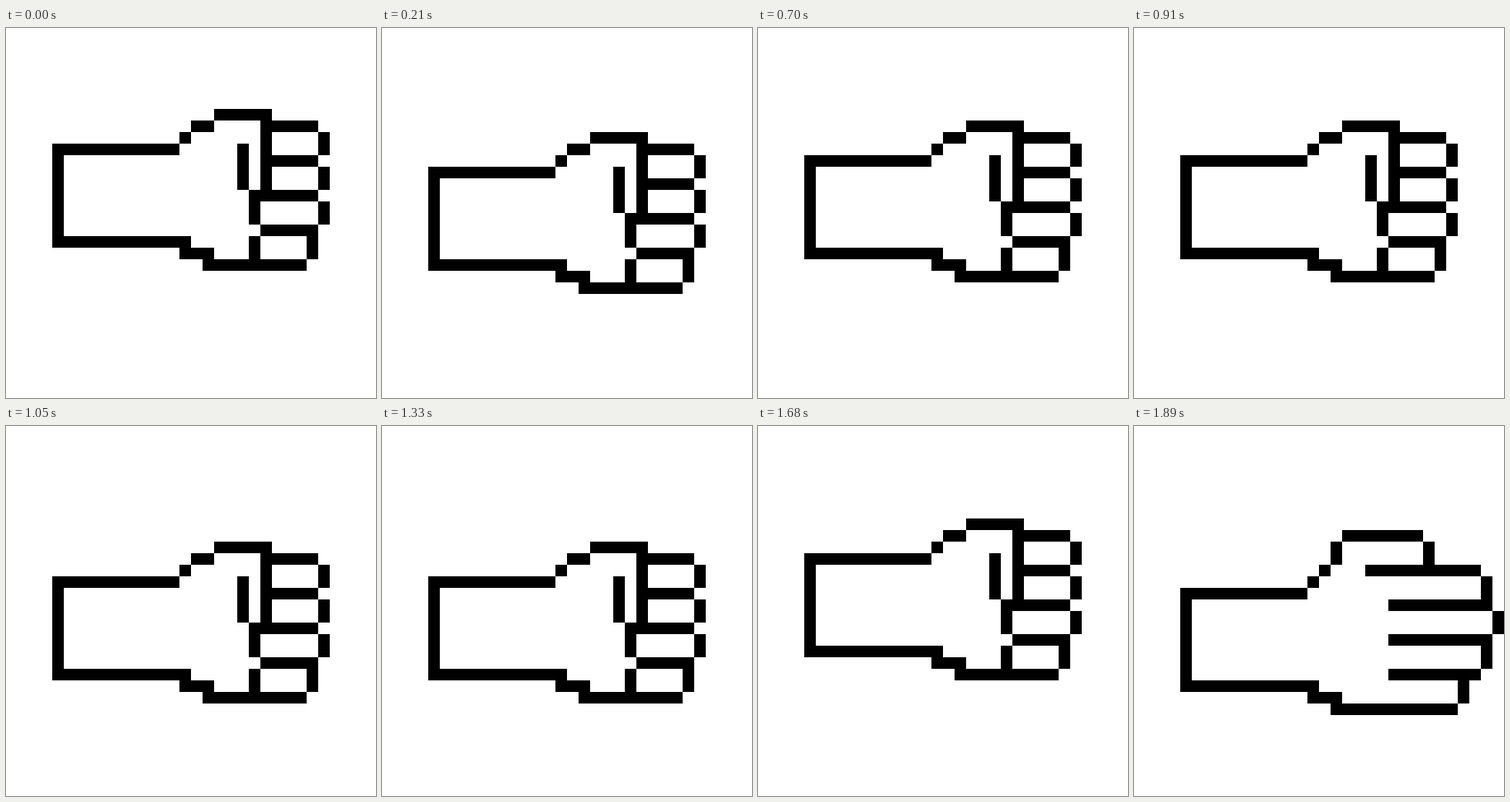
An HTML page for the animation above (3.08 s loop, 512 by 512 pixels).

```html
<!DOCTYPE html>
<html lang="en">
<head>
<meta charset="utf-8">
<title>Rock, paper, scissors</title>
<style>
  html, body { margin: 0; height: 100%; overflow: hidden; background: #fff; }
  svg { display: block; width: 100%; height: 100%; }
  path { fill: none; stroke: #000; stroke-width: 1; stroke-linecap: square; }
</style>
</head>
<body>
<!-- One unit is one big pixel; the half-unit shift puts strokes on pixel centres. -->
<svg viewBox="-.5 -.5 32 32" shape-rendering="crispEdges">
  <g id="hand">
    <path d="M15 9h0 M14 10H4V18H15 M15 19h2"/>
    <path id="fist" d="M16 8h1 M18 7h4v7 M22 8h4 M27 9v1 M22 11h4 M27 12v1 M20 10v3
      M26 14h-5v2 M27 15v1 M22 17h4v2 M21 18v2 M17 20h8"/>
    <path id="paper" d="M16 8h0 M17 6v1 M18 5h6 M25 6v2 M20 8h9 M30 9v2h-8 M31 12v1
      M22 14h8v2 M22 17h7 M28 17v2 M17 20h10"/>
  </g>
</svg>
<script>
  const STEP = 70, LOOP = 3080;
  const SWING = 11;        // steps in one down-and-up swing
  const OPEN_STEP = 27;    // the hand opens at the bottom of the third swing
  const DEPTH = 4;
  const [hand, fist, paper] = ['hand', 'fist', 'paper'].map(id => document.getElementById(id));

  function dropAt(step) {
    const phase = (step + 9) % SWING;
    return Math.max(0, Math.min(DEPTH, phase + 1, 9 - phase));
  }

  function draw() {
    const step = Math.floor(performance.now() % LOOP / STEP);
    const open = step >= OPEN_STEP;
    hand.setAttribute('transform', `translate(0 ${open ? DEPTH : dropAt(step)})`);
    fist.style.display = open ? 'none' : '';
    paper.style.display = open ? '' : 'none';
    requestAnimationFrame(draw);
  }
  draw();
</script>
</body>
</html>
```
